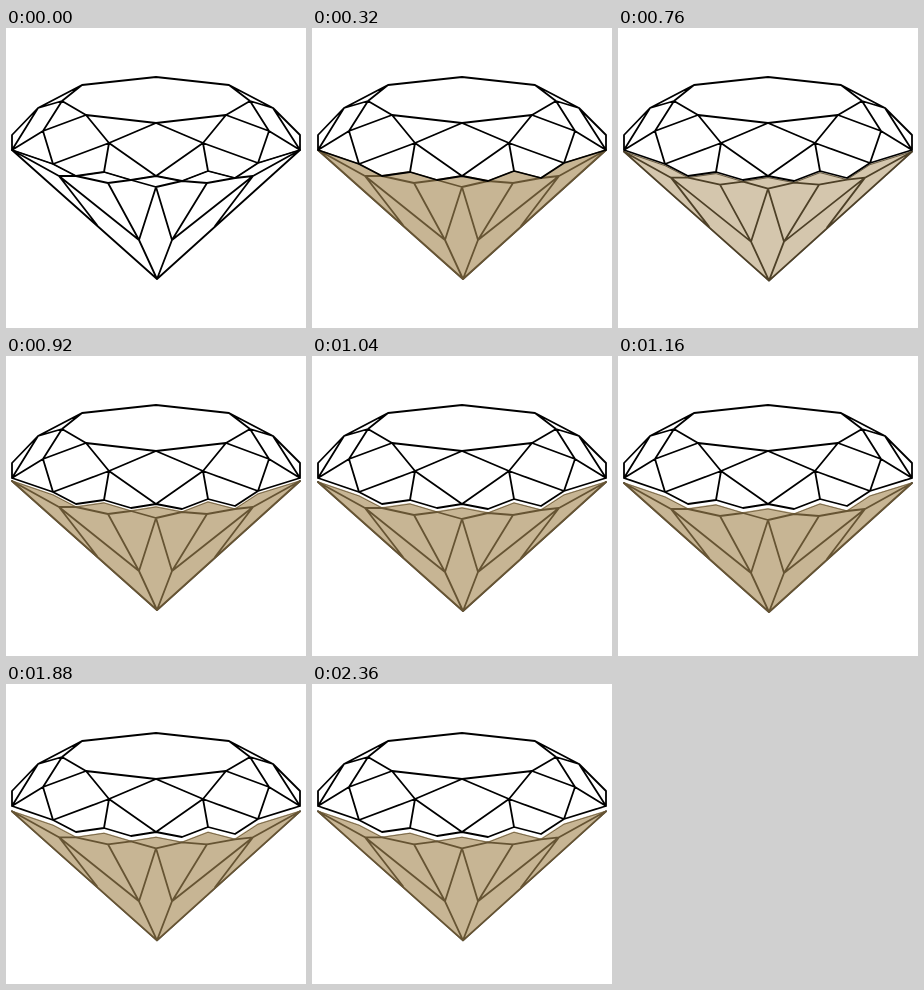
Recreate the animation shown at these times as an HTML page. Size 300x300 px, loop 2400 ms.

```html
<!DOCTYPE html>
<html lang="en">
<head>
<meta charset="utf-8">
<title>Diamond</title>
<style>
  html, body { margin: 0; width: 100%; height: 100%; overflow: hidden; background: #fff; }
  svg { display: block; width: 100vw; height: 100vh; }
  path { stroke-width: 1.8; stroke-linejoin: round; stroke-linecap: round; }
  .line { fill: none; stroke: #000; }
  .tint { fill: #a58853; stroke: #a58853; }
</style>
</head>
<body>
<svg viewBox="0 0 300 300">
  <g id="base">
    <path class="line" d="M6 122L151 251L294 122
      M6 122L53 148L70 148L102 155L125 152L150 159L176 153L201 155L229 150L247 148L294 122
      M91 197L53 148L133 212L102 155 M133 212L150 159L166 212L201 155 M166 212L247 148L209 198
      M133 212L151 251L166 212"/>
    <path class="line" style="stroke-width:.8" d="M6 122L47 136L70 148L98 144L125 152L150 148L176 153L202 143L229 150L252 135L294 122"/>
    <path class="tint" id="tint" d="M6 122L47 136L70 148L98 144L125 152L150 148L176 153L202 143L229 150L252 135L294 122L151 251Z"/>
  </g>
  <path class="line" d="M6 122L6 107L32 80L76 57L150 49L223 57L267 80L294 107L294 122
    L252 135L229 150L202 143L176 153L150 148L125 152L98 144L70 148L47 136Z
    M6 122L32 80L56 73L76 57 M223 57L244 73L267 80L294 122
    M56 73L80 87L150 95L220 87L244 73
    M56 73L37 103L80 87L103 115L150 95L197 115L220 87L263 103L244 73
    M6 122L37 103L47 136L103 115L98 144 M103 115L150 148L197 115L202 143
    M197 115L252 135L263 103L294 122"/>
</svg>
<script>
  const LOOP = 2400, STEP = 40;
  const alpha = [[0, 0], [40, 0], [320, .62], [600, .62], [700, .47], [760, .47], [920, .62], [LOOP, .62]];
  const drop = [[0, 0], [560, 0], [1160, 5], [1240, 5.3], [LOOP, 5.3]];
  const base = document.getElementById('base');
  const tint = document.getElementById('tint');

  function at(keys, t) {
    const i = keys.findIndex(k => k[0] > t);
    const [t0, a] = keys[i - 1], [t1, b] = keys[i];
    return a + (b - a) * (t - t0) / (t1 - t0);
  }

  const start = performance.now();
  function draw() {
    const now = Math.max(0, performance.now() - start) % LOOP;
    const t = Math.floor(now / STEP) * STEP;
    tint.setAttribute('opacity', t < 80 ? 0 : at(alpha, t));
    base.setAttribute('transform', `translate(0 ${at(drop, t)})`);
    requestAnimationFrame(draw);
  }
  draw();
</script>
</body>
</html>
```
